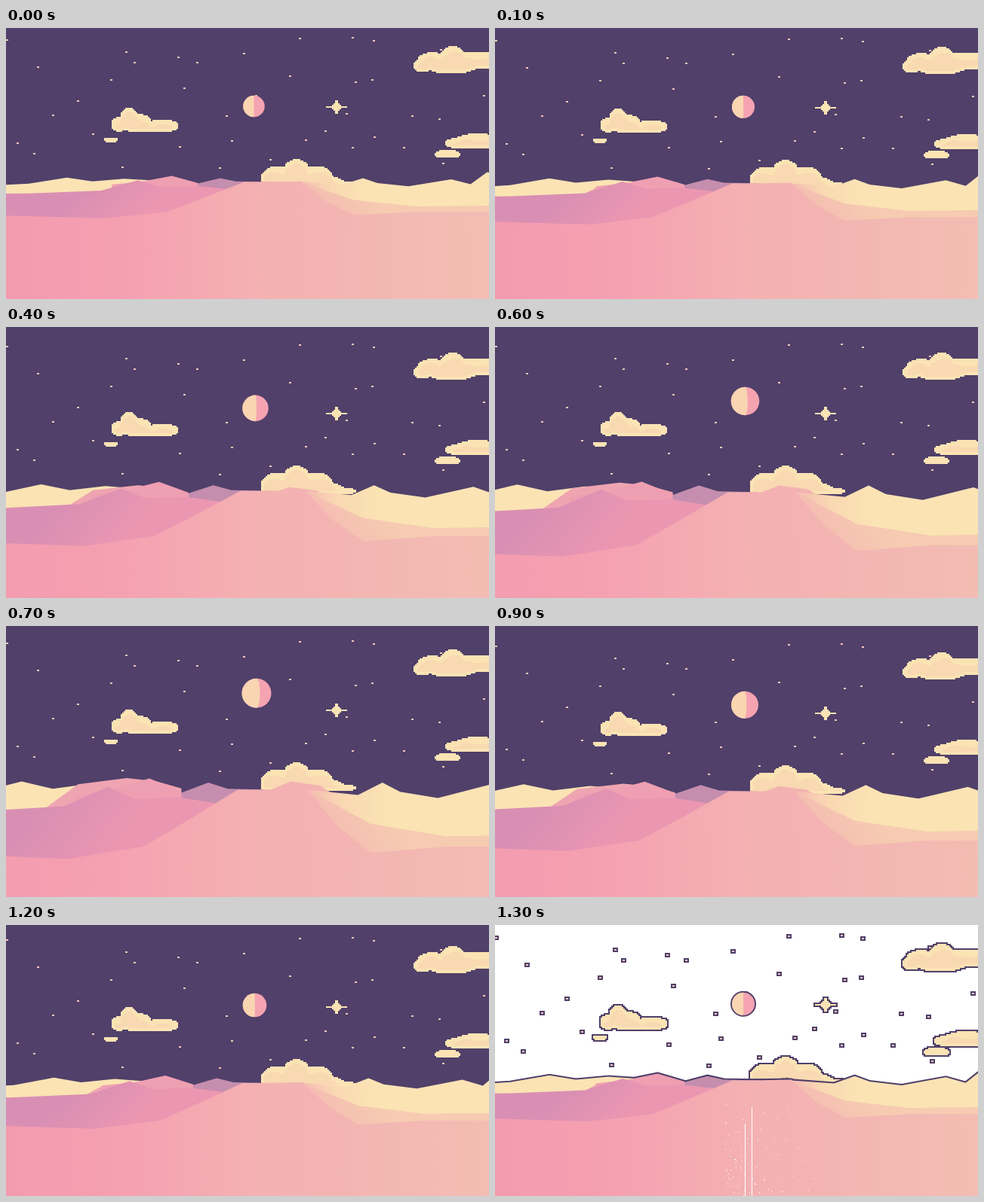
An HTML page with a canvas that plays this animation: 640x360 px, repeating every 1400 ms.

```html
<!DOCTYPE html>
<html lang="en">
<head>
<meta charset="utf-8">
<title>Dusk dunes</title>
<style>
  html, body { margin: 0; width: 100%; height: 100%; overflow: hidden; background: #50406a; }
  canvas { display: block; width: 640px; height: 360px; }
</style>
</head>
<body>
<canvas id="stage" width="640" height="360"></canvas>
<script>
const W = 640, H = 360, STEP = 100, COUNT = 14, HALF = COUNT / 2, PAD = 20, CELL = 2;
const INK = '#50406a', CREAM = '#fbe3b4', SHADE = '#f8d9b1', SALMON = '#f4b6b2';
const EYE = { x: 355, y: 198 };
const ctx = document.getElementById('stage').getContext('2d');

function random(seed) {
  return () => (seed = seed * 16807 % 2147483647) / 2147483647;
}

function ramp(x0, y0, x1, y1, ...colors) {
  const g = ctx.createLinearGradient(x0, y0, x1, y1);
  colors.forEach((c, i) => g.addColorStop(i / (colors.length - 1), c));
  return g;
}

// Clouds: a flat base and a few puffs, each [x, y, rx, ry].
const westClouds = [
  { base: 138, puffs: [[163, 118, 12, 12], [150, 128, 11, 10], [175, 125, 18, 11], [190, 132, 35, 8], [207, 130, 22, 9]] },
  { base: 152, puffs: [[139, 148.5, 9.5, 3.5]] }
];
const clouds = [
  { base: 60, puffs: [[592, 36, 16, 12], [565, 44, 20, 12], [552, 50, 12, 9], [625, 43, 40, 11], [590, 50, 35, 11]] },
  { base: 161, puffs: [[625, 151, 32, 11], [600, 153, 19, 7]] },
  { base: 173, puffs: [[585, 168, 18, 6.5]] },
  { base: 213, puffs: [[385, 190, 17, 16], [362, 202, 25, 19], [410, 200, 24, 17], [400, 207, 50, 13], [445, 208, 20, 5]] }
];

// Land from back to front, drawn halfway through the flight; the camera's zoom moves it.
const flesh = ramp(0, 0, W, 0, '#f49bb0', '#f5a1b1', '#f4b0b2', '#f3b6b2', '#f3bdb3');
const hills = [
  { fill: CREAM, pts: [-60, 214, 0, 210, 55, 199, 92, 206, 138, 201, 175, 204] },
  { fill: '#efa5b1', lift: -15, pts: [85, 230, 122, 208, 180, 202, 215, 205, 245, 212] },
  { fill: '#c58eae', pts: [225, 216, 277, 200, 300, 206, 350, 207] },
  { fill: '#ef9fb2', pts: [120, 212, 165, 206, 207, 196, 245, 209] },
  { fill: ramp(80, 225, 150, 290, '#d98fb3', '#ec97b1'),
    pts: [-60, 229, 0, 228, 105, 223, 158, 204, 190, 216, 240, 214, 300, 222] },
  { fill: flesh, pts: [-60, 268, 110, 274, 200, 262, 250, 238, 312, 207, 340, 207, 395, 206, 430, 235, 700, 238] },
  { fill: flesh, lift: -12, pts: [320, 222, 375, 204, 410, 208, 460, 235] },
  { fill: ramp(410, 285, 490, 225, SALMON, '#f6cbb1'), closed: true,
    pts: [395, 207, 470, 228, 720, 235, 720, 262, 560, 262, 470, 268, 430, 242] },
  { fill: ramp(385, 0, 490, 0, SALMON, '#f9d8b2', CREAM), closed: true,
    pts: [395, 207, 455, 212, 484, 200, 505, 209, 550, 215, 612, 202, 640, 211, 664, 189, 720, 200,
      720, 250, 560, 252, 470, 240] }
].map(h => ({ ...h, path: outline(h) }));

function outline({ pts, closed }) {
  const p = new Path2D();
  for (let i = 0; i < pts.length; i += 2) p.lineTo(pts[i], pts[i + 1]);
  if (!closed) {
    p.lineTo(pts[pts.length - 2], 2 * H);
    p.lineTo(pts[0], 2 * H);
  }
  p.closePath();
  return p;
}

// Paints every cell for which color(x, y) gives a colour.
function pixelate(c, color) {
  for (let y = 0; y < 220; y += CELL) {
    for (let x = 0; x < W; x += CELL) {
      const fill = color(x + CELL / 2, y + CELL / 2);
      if (!fill) continue;
      c.fillStyle = fill;
      c.fillRect(x, y, CELL, CELL);
    }
  }
}

function cloudColor({ base, puffs }) {
  const inside = (x, y) => y < base &&
    puffs.some(([px, py, rx, ry]) => ((x - px) / rx) ** 2 + ((y - py) / ry) ** 2 < 1);
  return (x, y) => {
    if (!inside(x, y)) return null;
    const deep = inside(x, y - 8 - 2 * Math.sin(x / 7)) && inside(x, y + 4) && inside(x - 5, y) && inside(x + 5, y);
    return deep ? SHADE : CREAM;
  };
}

function glintColor(x, y) {
  const d = (Math.abs(x - 438) / 14) ** 0.55 + (Math.abs(y - 105) / 15) ** 0.55;
  return d < 1 ? CREAM : null;
}

function scatterStars(c) {
  const rnd = random(41);
  c.fillStyle = '#f6c9b8';
  for (let i = 0; i < 40; i++) {
    const x = (i % 8 + rnd()) * W / 8, y = (Math.floor(i / 8) + rnd()) * 39;
    c.fillRect(Math.round(x), Math.round(y), 3, 2);
  }
}

// A painted sky sheet and its silhouette in ink.
function sheet(paint) {
  const make = () => Object.assign(document.createElement('canvas'), { width: W, height: H + PAD });
  const art = make(), ink = make();
  const a = art.getContext('2d'), b = ink.getContext('2d');
  a.translate(0, PAD);
  paint(a);
  b.drawImage(art, 0, 0);
  b.globalCompositeOperation = 'source-in';
  b.fillStyle = INK;
  b.fillRect(0, 0, W, H + PAD);
  return { art, ink };
}

const sky = sheet(c => {
  scatterStars(c);
  clouds.forEach(cloud => pixelate(c, cloudColor(cloud)));
  pixelate(c, glintColor);
});
const west = sheet(c => westClouds.forEach(cloud => pixelate(c, cloudColor(cloud))));

function drawSheet(s, dy, outlined) {
  const y = Math.round(dy) - PAD;
  for (let a = 0; outlined && a < 8; a++) {
    const turn = a * Math.PI / 4;
    ctx.drawImage(s.ink, Math.round(2.4 * Math.cos(turn)), y + Math.round(2.4 * Math.sin(turn)));
  }
  ctx.drawImage(s.art, 0, y);
}

function drawMoon(p, bob, outlined) {
  const x = 328.5 + 3.5 * p, y = 104 + bob - 22 * p ** 2.3, r = 14.3 + 5.2 * p, q = Math.PI / 2;
  const disc = (radius, color) => {
    ctx.fillStyle = color;
    ctx.beginPath();
    ctx.arc(x, y, radius, 0, 4 * q);
    ctx.fill();
  };
  if (outlined) disc(r + 2, INK);
  disc(r, '#f5a3b1');
  ctx.fillStyle = '#f9d5b1';
  ctx.beginPath();
  ctx.arc(x, y, r, q, 3 * q);
  ctx.ellipse(x, y, 4.5 * p * p, r, 0, -q, q);
  ctx.fill();
}

function drawLand(p, bob, outlined) {
  const z = p - 3 / 7;
  const pass = paint => hills.forEach(h => {
    ctx.save();
    ctx.translate(EYE.x, EYE.y + bob + (h.lift || 0) * z);
    ctx.scale(1 + 0.2 * z, 1 + 0.65 * z);
    ctx.translate(-EYE.x, -EYE.y);
    paint(h);
    ctx.restore();
  });
  ctx.strokeStyle = INK;
  ctx.lineWidth = 5;
  if (outlined) pass(h => ctx.stroke(h.path));
  pass(h => {
    ctx.fillStyle = h.fill;
    ctx.fill(h.path);
  });
}

function drawHoles() {
  const rnd = random(7);
  ctx.fillStyle = '#fff';
  ctx.fillRect(331, 264, 1, 96);
  ctx.fillRect(340, 242, 1, 118);
  for (let i = 0; i < 80; i++) {
    const x = 305 + 140 * rnd() * rnd(), y = 225 + 135 * Math.sqrt(rnd());
    ctx.fillRect(Math.round(x), Math.round(y), 1, 1);
  }
}

function draw(step) {
  const k = Math.min(step, COUNT - step), p = k / HALF;
  const bob = 5.5 * (1 - Math.cos(k * Math.PI / 5));
  const blank = step === COUNT - 1;
  ctx.fillStyle = blank ? '#fff' : INK;
  ctx.fillRect(0, 0, W, H);
  drawSheet(sky, bob, blank);
  drawSheet(west, bob * 0.7, blank);
  drawMoon(p, bob, blank);
  drawLand(p, bob, blank);
  if (blank) drawHoles();
}

let shown = -1;
function tick() {
  const step = Math.floor(performance.now() / STEP) % COUNT;
  if (step !== shown) draw(shown = step);
  requestAnimationFrame(tick);
}
tick();
</script>
</body>
</html>
```
